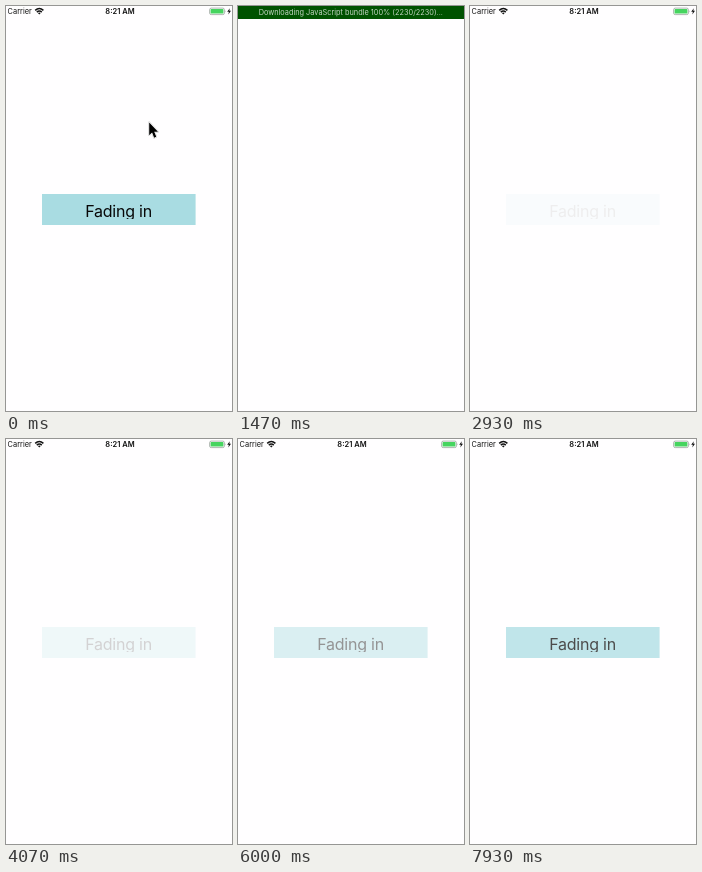
Animation, 226 px wide and 405 px high, one loop 8000 ms. Source, as an HTML page:

```html
<!DOCTYPE html>
<html lang="en">
<head>
<meta charset="utf-8">
<title>Fade in</title>
<style>
html, body { margin: 0; width: 100%; height: 100%; overflow: hidden; background: #fffeff; }
svg { display: block; width: 100%; height: 100%; }
text { font-family: Inter, "Liberation Sans", sans-serif; }
#cursor { filter: drop-shadow(0 .6px .7px rgba(0, 0, 0, .5)); }
</style>
</head>
<body>
<svg viewBox="0 0 226 405">
  <defs><clipPath id="label"><rect x="36" y="188" width="154" height="25"/></clipPath></defs>
  <rect width="226" height="405" fill="#fffeff"/>

  <g id="status" fill="#111">
    <text x="1.6" y="8.1" font-size="7.4">Carrier</text>
    <g fill="none" stroke="#111" stroke-width="1.5">
      <path d="M29.2 4.4Q33.3 .7 37.4 4.4"/>
      <path d="M30.8 6.1Q33.3 3.9 35.8 6.1"/>
    </g>
    <path d="M31.9 7.1Q33.3 6 34.7 7.1L33.3 8.6Z"/>
    <text x="114" y="8.1" font-size="7.5" font-weight="600" text-anchor="middle">8:21 AM</text>
    <rect x="203.6" y="2.1" width="14.8" height="6.5" rx="1.6" fill="none" stroke="#8f9a91" stroke-width=".7"/>
    <rect x="204.6" y="3.1" width="12.8" height="4.5" rx=".7" fill="#46d45f"/>
    <path d="M219.2 4.2q1 1.1 0 2.3z" fill="#8f9a91"/>
    <path d="M223.8 2.2L221.2 5.8H222.9L222.3 8.5L225 4.8H223.3Z"/>
  </g>

  <g id="box">
    <rect x="36" y="188" width="153.6" height="31" fill="#a9dce2"/>
    <text x="112.6" y="210.8" font-size="16" letter-spacing="-.22" text-anchor="middle" fill="#080808" clip-path="url(#label)">Fading in</text>
  </g>

  <g id="banner">
    <rect y="-1" width="226" height="14" fill="#005200"/>
    <text id="message" x="112.8" y="8.6" font-size="7.35" text-anchor="middle" fill="#c3d6c3"></text>
  </g>

  <path id="cursor" d="M143.2 116.4V129.3L146.1 126.5L148.1 131.7L150.3 130.8L148.2 125.7H152Z"
    fill="#000" stroke="#fff" stroke-width="1.5" paint-order="stroke" stroke-linejoin="round"/>
</svg>
<script>
const LOOP = 8000, RATE = 15;
const RELOAD = 270, BUNDLE = 1470, HIDE = 1690, HIDE_TIME = 270;
const FADE_START = 1450, FADE_TIME = 10000, FIRST_SEEN = 2930, FADE_SEEN = 3270;
const $ = id => document.getElementById(id);
const box = $("box"), banner = $("banner"), message = $("message"), cursor = $("cursor");
const show = (el, on) => el.setAttribute("visibility", on ? "visible" : "hidden");
const clamp = x => Math.min(1, Math.max(0, x));

// cubic-bezier(.42, 0, 1, 1), solved by bisection
function easeIn(x) {
  let lo = 0, hi = 1;
  for (let i = 0; i < 24; i++) {
    const s = (lo + hi) / 2, r = 1 - s;
    if (1.26 * r * r * s + 3 * r * s * s + s ** 3 < x) lo = s; else hi = s;
  }
  return 3 * (1 - lo) * lo * lo + lo ** 3;
}
const easeInOut = x => x < .5 ? easeIn(2 * x) / 2 : 1 - easeIn(2 - 2 * x) / 2;

function fade(t) {
  if (t < RELOAD) return 1;
  if (t < FIRST_SEEN) return 0;
  const seen = t < FADE_SEEN ? FIRST_SEEN : t;
  return easeInOut(clamp((seen - FADE_START) / FADE_TIME));
}

function draw(now) {
  // the picture advances fifteen times a second
  const t = Math.floor((now % LOOP + 4) * RATE / 1000) * 1000 / RATE + 4;

  box.setAttribute("opacity", fade(t));

  const slide = easeInOut(clamp((t - HIDE) / HIDE_TIME));
  show(banner, t >= RELOAD && slide < 1);
  banner.setAttribute("transform", `translate(0 ${-13 * slide})`);
  message.textContent = t < BUNDLE
    ? "Loading from localhost:8081..."
    : "Downloading JavaScript bundle 100% (2230/2230)...";

  show(cursor, t < 800);
  cursor.setAttribute("transform", t < 730 ? "" : "translate(-13.5 7)");
}

const start = performance.now();
function tick() {
  draw(performance.now() - start);
  requestAnimationFrame(tick);
}
tick();
</script>
</body>
</html>
```
